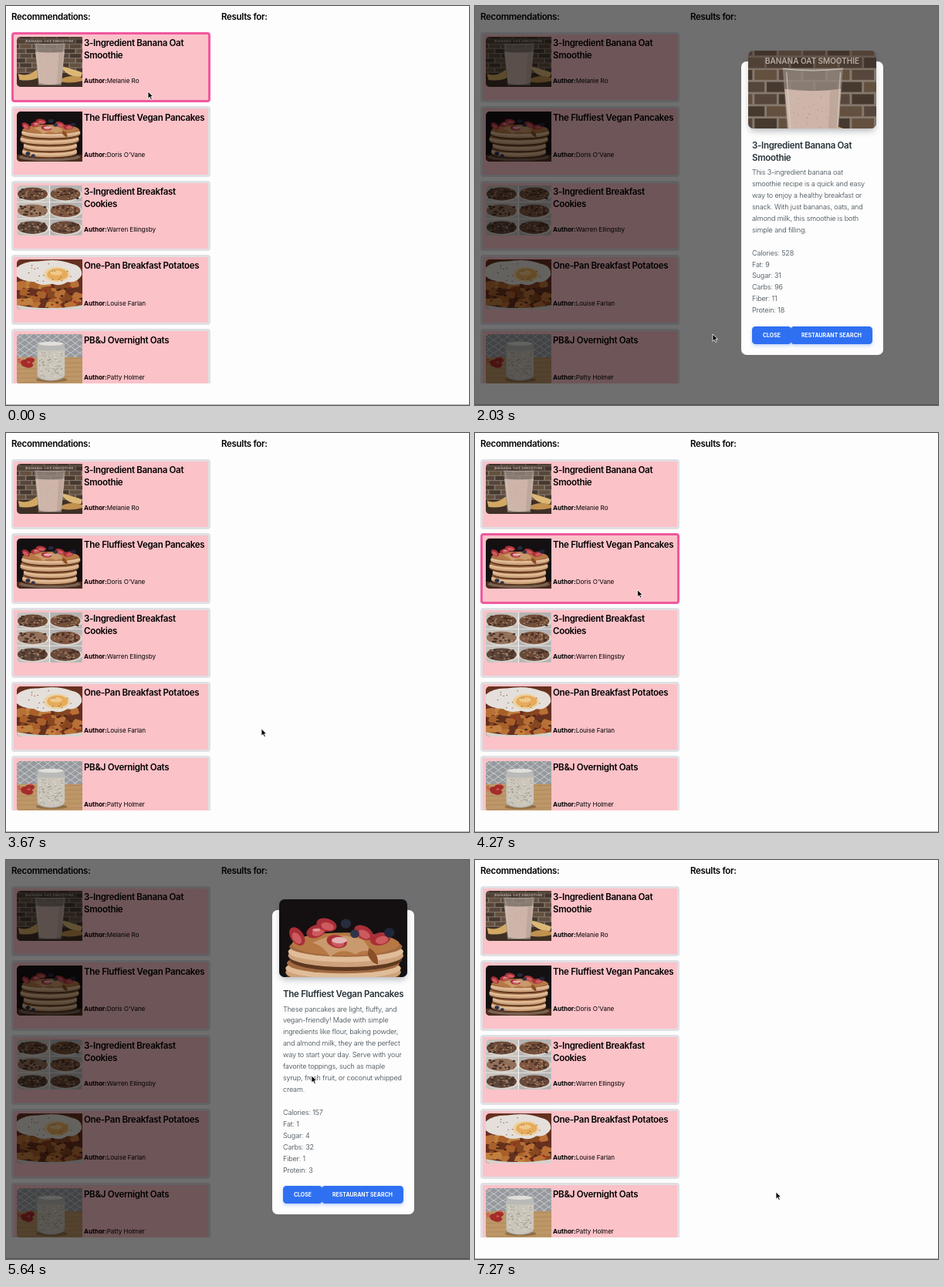
Recreate the animation shown at these times as an HTML page. Size 600 by 518 pixels, loop 7.3 s.

```html
<!DOCTYPE html>
<html lang="en">
<head>
<meta charset="utf-8">
<title>Recipe recommendations</title>
<style>
html, body { margin: 0; width: 100%; height: 100%; overflow: hidden; }
#stage { position: relative; width: 600px; height: 518px; overflow: hidden; background: #fdfdfd; font-family: Inter, "Open Sans", sans-serif; color: #000; }
#stage div, #stage svg { position: absolute; box-sizing: border-box; white-space: pre; }
#list { left: 0; top: 0; width: 270px; height: 490px; overflow: hidden; }
.card { left: 7px; width: 258px; height: 91.5px; border: 3px solid #dfe0e4; border-radius: 4px; background: #fbc2c8; }
.card.hover { border-color: #f0589f; }
.card svg { left: 4px; top: 3.5px; width: 85px; height: 65px; border-radius: 5px 0 0 5px; }
.title { font: 600 11.5px/16px Inter, "Open Sans", sans-serif; letter-spacing: -.3px; }
.author { left: 91px; top: 54px; font-size: 8.1px; line-height: 12px; letter-spacing: -.05px; }
#rule { left: 0; top: 517px; width: 600px; height: 1px; background: #b4b4b4; }
.modal { inset: 0; background: rgba(0, 0, 0, .56); }
.panel { left: 345px; width: 184px; border-radius: 7px; background: #fdfdfd; color: #263238; }
.photo { left: 9px; top: -14px; width: 166px; height: 101px; border-radius: 7px; overflow: hidden; background: linear-gradient(100deg, #2f73f4, #1f50e0); box-shadow: 0 5px 9px -2px rgba(40, 50, 60, .35); }
.photo svg { width: 166px; height: 101px; }
.text { left: 14px; font-size: 9.1px; line-height: 14.93px; letter-spacing: -.15px; font-weight: 350; color: #37434b; }
.button { height: 23px; border-radius: 4.5px; background: #2f70f2; color: #fff; font-size: 6.9px; font-weight: 700; line-height: 23px; letter-spacing: .06px; text-align: center; box-shadow: 0 2px 4px rgba(47, 112, 242, .3); }
#cursor { left: 0; top: 0; width: 10px; height: 14px; overflow: visible; }
</style>
</head>
<body>
<div id="stage"></div>
<script>
let seed = 7;
const rand = (a, b) => {
  seed = seed * 16807 % 2147483647;
  return (a + (b - a) * seed / 2147483647).toFixed(1);
};
const repeat = (n, f) => Array.from({ length: n }, (_, i) => f(i)).join('');
const rect = (x, y, w, h, fill) => `<rect x="${x}" y="${y}" width="${w}" height="${h}" fill="${fill}"/>`;
const oval = (x, y, rx, ry, fill) => `<ellipse cx="${x}" cy="${y}" rx="${rx}" ry="${ry}" fill="${fill}"/>`;
const path = (d, fill, more = '') => `<path d="${d}" fill="${fill}" ${more}/>`;
const specks = (n, x0, x1, y0, y1, r, fill) =>
  repeat(n, () => oval(rand(x0, x1), rand(y0, y1), r, r * .8, fill));

// Each picture is drawn on a 100 by 100 square.
function smoothie() {
  const bricks = repeat(8, r => repeat(7, c =>
    rect(c * 19 - 14 + r % 2 * 9.5, r * 9.5 - 4, 17.2, 7.8, ['#57463c', '#46392f', '#64503f'][(r * 2 + c) % 3])));
  return rect(0, 0, 100, 100, '#85786c') + bricks + rect(0, 0, 100, 14, 'rgba(60,48,40,.45)')
    + rect(0, 72, 100, 28, '#3f2f25')
    + path('M2 74Q20 82 36 58L42 62Q38 92 4 86Z', '#d2a964')
    + path('M98 80Q78 82 66 58L72 60Q90 66 100 72Z', '#dcb877')
    + path('M68 84Q82 74 100 82V88Q82 94 68 90Z', '#c0914f')
    + path('M27 14H74L68 97H33Z', '#93877f', 'opacity=".8"')
    + path('M28.5 30Q51 33 72.5 30L67 93Q50 98 34 93Z', '#cdb5a9')
    + path('M64 31L72.5 30L67 93L61 95Z', '#b89f93', 'opacity=".6"')
    + specks(45, 34, 67, 33, 90, .5, '#b39a8d')
    + path('M27 14Q50 17 74 14M30 17L35 92M72 17L68 92', 'none', 'stroke="#d9d2cc" stroke-width=".8" opacity=".7"')
    + '<text x="50" y="10.2" font-size="6" font-weight="600" text-anchor="middle" fill="#b5aca5">BANANA OAT SMOOTHIE</text>';
}

function pancakes() {
  const layer = (x, y, rx) => oval(x, y + 7, rx - 1, 9, '#5d3820') + oval(x, y + 4, rx, 9, '#cda27c')
    + oval(x, y + 1, rx, 8, '#e0bd98') + oval(x, y - 3, rx - 1, 8, '#a26a41');
  const berry = (x, y, a) => `<g transform="translate(${x} ${y}) rotate(${a})">`
    + oval(0, 0, 8, 5, '#a92f38') + oval(1, 1, 5, 3, '#cc5a5e') + '</g>';
  return rect(0, 0, 100, 100, '#141011') + rect(0, 86, 100, 14, '#4a2d1c')
    + oval(50, 91, 47, 8, '#7a6152') + oval(50, 87, 42, 7, '#2b1b14')
    + layer(50, 78, 42) + layer(51, 66, 41) + layer(50, 53, 45) + layer(52, 40, 45)
    + oval(52, 35, 42, 9, '#b67844')
    + path('M26 34Q45 24 66 32L72 41Q64 39 60 43Q48 37 40 45Q34 36 26 34Z', '#c99a6d')
    + path('M70 38Q78 42 77 51Q72 50 69 43Z', '#8a4f26')
    + berry(29, 25, -20) + berry(14, 29, 55) + berry(45, 33, 12) + berry(66, 26, 30) + berry(79, 31, -12) + berry(37, 20, 15)
    + oval(47, 32, 6, 2.5, '#e2b3b3') + oval(29, 24, 3, 1.2, '#dd9a9a')
    + oval(52, 19, 4, 3.7, '#262b3d') + oval(86, 26, 4, 3.8, '#20253a') + oval(59, 27, 3.5, 3.3, '#30354b')
    + oval(17, 84, 3.5, 3.5, '#27304a') + oval(25, 88, 3, 3, '#30354b');
}

function cookies() {
  return rect(0, 0, 100, 100, '#d8d4ce') + repeat(6, i => {
    const x = i % 2 * 50 + 25, y = (i >> 1) * 33.5 + 16;
    const brown = ['#6b4a38', '#75503a', '#92705a', '#805640', '#5d463a', '#6a4a3a'][i];
    return rect(x - 24.5, y - 16, 49, 32.5, i % 2 ? '#b4b3b3' : '#c6c2bd')
      + oval(x, y + 2, 25, 14, '#dcd7d1') + oval(x - 1, y + 1, 23, 13, brown)
      + specks(18, x - 19, x + 18, y - 8, y + 10, 2.4, '#493127')
      + specks(16, x - 19, x + 18, y - 8, y + 10, 1.6, '#a88468');
  }) + rect(49.3, 0, 1.4, 100, '#f2efec') + rect(0, 32.5, 100, 1, '#f2efec') + rect(0, 66, 100, 1, '#f2efec');
}

function potatoes() {
  const cube = () => `<rect width="15" height="14" rx="4" fill="${['#a9602a', '#c0803f', '#864721', '#b87036'][rand(0, 3.9) | 0]}" transform="translate(${rand(-6, 94)} ${rand(40, 92)}) rotate(${rand(-35, 35)})"/>`;
  return rect(0, 0, 100, 100, '#66301f') + repeat(38, cube)
    + specks(16, 2, 98, 55, 98, 2.3, '#4b2417') + specks(9, 2, 98, 55, 98, 2, '#a8271a')
    + path('M0 16Q12 3 32 4Q62 -3 84 9Q100 13 99 31Q92 48 77 45Q66 55 54 49Q36 54 27 45Q8 44 0 34Z', '#e4dfda')
    + oval(61, 30, 20, 15, '#ecd2a2') + oval(62, 30, 16, 12, '#e6ac5c') + oval(60, 27, 9, 5, '#f0c88a')
    + specks(18, 14, 88, 9, 44, 1, '#78502f')
    + path('M0 91Q50 103 100 91V100H0Z', '#d6d1cd');
}

function oats() {
  const lattice = repeat(4, r => repeat(8, c =>
    path(`M${c * 14 - 2} ${r * 13 - 2}l7 7-7 7-7-7Z`, 'none', 'stroke="#c6c7ca" stroke-width="1.2"')));
  return rect(0, 0, 100, 100, '#96999d') + lattice + rect(0, 46, 100, 54, '#bd9768')
    + repeat(6, i => path(`M0 ${52 + i * 9}L100 ${48 + i * 9}`, 'none', 'stroke="#a87f50" stroke-width=".8"'))
    + specks(5, 4, 22, 49, 66, 7, '#a42c2a') + specks(4, 3, 23, 46, 64, 2.5, '#cf5b50')
    + oval(53, 91, 24, 5, '#927049')
    + path('M33 18H71Q75 27 73 40V82Q72 92 52 93Q32 92 31 82V40Q29 27 33 18Z', '#b9bab7')
    + path('M32 32Q52 35 73 32V80Q70 90 52 91Q34 90 32 80Z', '#cbc5ba')
    + oval(52, 19, 19, 4, '#e0dfdc')
    + specks(60, 35, 70, 36, 86, 1.1, '#97938b') + specks(25, 35, 70, 36, 86, 1.1, '#ece6db');
}

const recipes = [
  ['3-Ingredient Banana Oat\nSmoothie', 'Melanie Ro', smoothie()],
  ['The Fluffiest Vegan Pancakes', "Doris O'Vane", pancakes()],
  ['3-Ingredient Breakfast\nCookies', 'Warren Ellingsby', cookies()],
  ['One-Pan Breakfast Potatoes', 'Louise Farlan', potatoes()],
  ['PB&amp;J Overnight Oats', 'Patty Holmer', oats()]
];
const details = [
  { open: 60, load: 420, close: 3300, top: 71.5, facts: [528, 9, 31, 96, 11, 18],
    about: 'This 3-ingredient banana oat\nsmoothie recipe is a quick and easy\nway to enjoy a healthy breakfast or\nsnack. With just bananas, oats, and\nalmond milk, this smoothie is both\nsimple and filling.' },
  { open: 4590, load: 5150, close: 6950, top: 64.5, facts: [157, 1, 4, 32, 1, 3],
    about: 'These pancakes are light, fluffy, and\nvegan-friendly! Made with simple\ningredients like flour, baking powder,\nand almond milk, they are the perfect\nway to start your day. Serve with your\nfavorite toppings, such as maple\nsyrup, fresh fruit, or coconut whipped\ncream.' }
];
const factNames = ['Calories', 'Fat', 'Sugar', 'Carbs', 'Fiber', 'Protein'];
const cardTop = i => 33.7 + i * 96.4;

const picture = (art, height) => `<svg viewBox="0 0 100 ${height}" preserveAspectRatio="none">${art}</svg>`;
const title = (x, y, text) => `<div class="title" style="left:${x}px;top:${y}px">${text}</div>`;
const button = (x, y, w, text) => `<div class="button" style="left:${x}px;top:${y}px;width:${w}px">${text}</div>`;

function card([name, author, art], i) {
  return `<div class="card" style="top:${cardTop(i)}px">${picture(art, 100)}${title(91, 3.5, name)}
<div class="author"><b>Author:</b>${author}</div></div>`;
}

function modal(d, i) {
  const name = recipes[i][0];
  const textTop = 122 + 15.5 * (name.split('\n').length - 1);
  const text = d.about + '\n\n' + factNames.map((n, k) => `${n}: ${d.facts[k]}`).join('\n');
  const buttonTop = textTop + text.split('\n').length * 14.93 + 13;
  return `<div class="modal"><div class="panel" style="top:${d.top}px;height:${buttonTop + 36.5}px">
<div class="photo">${picture(recipes[i][2], 60.8)}</div>${title(14, 101.5, name)}
<div class="text" style="top:${textTop}px">${text}</div>
${button(14, buttonTop, 51, 'CLOSE')}${button(64, buttonTop, 106, 'RESTAURANT SEARCH')}</div></div>`;
}

const stage = document.getElementById('stage');
stage.innerHTML = title(7, 6, 'Recommendations:') + title(279, 6, 'Results for:')
  + `<div id="list">${recipes.map(card).join('')}</div><div id="rule"></div>`
  + details.map(modal).join('')
  + '<svg id="cursor"><path d="M0 0V9.2L2.2 7.2L3.7 10.6L5.3 9.9L3.8 6.6H6.7Z" fill="#000" stroke="#fff" stroke-width=".8"/></svg>';

const cards = [...stage.querySelectorAll('.card')];
const modals = [...stage.querySelectorAll('.modal')];
const cursor = document.getElementById('cursor');

// time, x, y of the pointer tip
const track = [
  [0, 184, 111], [640, 178, 107], [1100, 178, 107], [2030, 308, 426], [2600, 384, 428],
  [3300, 384, 428], [3670, 331, 384], [3820, 318, 374], [4400, 195, 179], [4820, 195, 179],
  [5640, 396, 280], [6300, 390, 431], [7300, 390, 431]
];
const clamp = v => Math.max(0, Math.min(1, v));

function pointer(t) {
  const i = track.findIndex(k => k[0] > t);
  const [t0, x0, y0] = track[i - 1], [t1, x1, y1] = track[i];
  const u = (t - t0) / (t1 - t0), e = u * u * (3 - 2 * u);
  return [x0 + (x1 - x0) * e, y0 + (y1 - y0) * e];
}

function draw(now) {
  const t = now % 7300;
  const [x, y] = pointer(t);
  cursor.style.transform = `translate(${x}px, ${y}px)`;
  let covered = false;
  details.forEach((d, i) => {
    const shown = Math.min(clamp((t - d.open) / 220), 1 - clamp((t - d.close) / 200));
    const el = modals[i];
    covered = covered || shown > 0;
    el.style.visibility = shown > 0 ? 'visible' : 'hidden';
    el.style.opacity = shown;
    el.firstChild.style.transform = `scale(${.9 + .1 * shown})`;
    el.querySelector('svg').style.opacity = t >= d.load ? 1 : 0;
  });
  cards.forEach((el, i) => {
    const inside = x > 7 && x < 265 && y > cardTop(i) && y < cardTop(i) + 91.5;
    el.classList.toggle('hover', inside && !covered);
  });
}

const start = performance.now();
function tick() {
  draw(performance.now() - start);
  requestAnimationFrame(tick);
}
tick();
</script>
</body>
</html>
```
